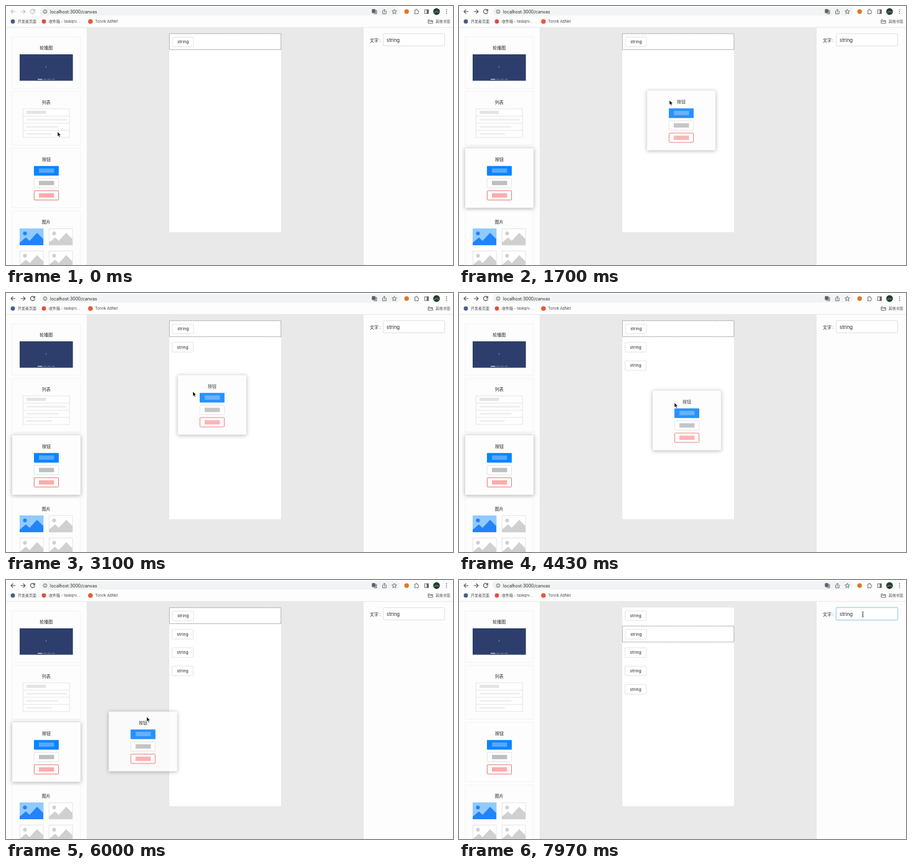
Animation of 720x418 px, one loop 8000 ms. Source, as an HTML page:

```html
<!DOCTYPE html>
<html lang="zh">
<head>
<meta charset="utf-8">
<title>Canvas editor</title>
<style>
html, body { margin: 0; width: 100%; height: 100%; overflow: hidden; background: #fff; }
svg { display: block; width: 100%; height: 100%; }
text { font-family: Inter, "Noto Sans CJK SC", "Noto Sans CJK", sans-serif; font-size: 7px; fill: #262626; }
.mid { text-anchor: middle; }
.bar { font-size: 6px; fill: #45494d; }
.line { fill: none; stroke: #5f6368; stroke-width: .9; }
.box { fill: #fdfdfd; stroke: #eeeeee; stroke-width: .7; }
.frame { fill: #fff; stroke: #d9d9d9; stroke-width: .7; }
.shade { filter: drop-shadow(0 1px 3px rgba(0, 0, 0, .32)); }
#nav { fill: none; stroke-width: 1.1; }
</style>
</head>
<body>
<svg viewBox="0 0 720 418" preserveAspectRatio="none">
  <defs>
    <g id="buttonFace">
      <rect class="box" width="110" height="96"/>
      <text class="mid" x="55" y="20">按钮</text>
      <rect x="35" y="28.5" width="40" height="15.5" rx="1" fill="#0a84ff"/>
      <rect x="43" y="32.5" width="24.5" height="7" fill="#54a9ff"/>
      <rect class="frame" x="35.3" y="48.6" width="39.4" height="15" rx="1"/>
      <rect x="43" y="52.5" width="24.5" height="7" fill="#bfbfbf"/>
      <rect x="35.4" y="68.4" width="39.2" height="15" rx="1" fill="#fff" stroke="#e8605f" stroke-width=".9"/>
      <rect x="43" y="72.5" width="24.5" height="7" fill="#fcacac"/>
    </g>
    <path id="hills" d="M0 27V23L10 14.5L16 20L28 7L38 17V27Z"/>
    <g id="picture">
      <rect class="frame" x=".3" y=".3" width="37.8" height="26.6"/>
      <use href="#hills" fill="#d0d0d0"/>
      <circle cx="8.5" cy="8" r="3.1" fill="#d0d0d0"/>
    </g>
  </defs>

  <rect width="720" height="418" fill="#fdfdfd"/>

  <g id="browser">
    <rect x="54" y="2" width="581" height="13.5" rx="6.7" fill="#f1f3f4"/>
    <g id="nav">
      <path d="M15.2 9H8M11.4 5.6L8 9L11.4 12.4"/>
      <path d="M23.8 9H31M27.6 5.6L31 9L27.6 12.4"/>
      <path d="M45.6 6.6A3.5 3.5 0 1 0 46.4 9.5M46.4 5V7.9H43.4"/>
    </g>
    <g class="line">
      <circle cx="63" cy="9" r="2.9"/>
      <path d="M63 8.6V10.7M63 7V7.8"/>
      <rect x="589.8" y="5.4" width="4.6" height="5.6" rx=".5" fill="#5f6368"/>
      <path d="M594.5 7H597V12.6H592.4M594 9H596.4M595 9.2L596 11.4"/>
      <path d="M607.6 8H606.6V12.6H612.2V8H611.2M609.4 10.6V5.3M607.6 7L609.4 5.2L611.2 7"/>
      <path d="M625.5 5.2L626.6 7.8L629.3 8L627.2 9.8L627.9 12.5L625.5 11L623.1 12.5L623.8 9.8L621.7 8L624.4 7.8Z"/>
      <path d="M658.2 7H660V6A1 1 0 0 1 662 6V7H663.8V8.8A1 1 0 0 1 663.8 10.8V12.6H658.2V10.8A1 1 0 0 0 658.2 8.8Z"/>
      <rect x="674.4" y="6" width="6.2" height="6.2"/>
      <path d="M679 6V12.2" stroke-width="2.8"/>
    </g>
    <circle cx="645.3" cy="9" r="3.7" fill="#e27625"/>
    <circle cx="693.5" cy="9" r="5.4" fill="#263c2c"/>
    <path d="M690 11Q693 7 697 10.5" fill="none" stroke="#718d78" stroke-width="1.4"/>
    <g fill="#4b4f53">
      <circle cx="709.5" cy="6" r=".8"/><circle cx="709.5" cy="9" r=".8"/><circle cx="709.5" cy="12" r=".8"/>
    </g>
    <text x="71" y="11.6">localhost:3000/canvas</text>
    <circle cx="11" cy="25" r="3.4" fill="#465f82"/>
    <circle cx="61" cy="25" r="3.4" fill="#e34c3e"/>
    <circle cx="136" cy="25" r="3.8" fill="#e75b32"/>
    <text class="bar" x="19" y="27.3">开发者页面</text>
    <text class="bar" x="69" y="27.3">收件箱 - taskqrv...</text>
    <text class="bar" x="143.5" y="27.3">Torvik AdNel</text>
    <path class="line" d="M680 22.5H683L684 23.6H687.2V28H680ZM680 24.8H687.2"/>
    <text class="bar" x="691.8" y="27.3">其他书签</text>
    <path d="M0 34.6H720" stroke="#e2e3e4" stroke-width=".8"/>
  </g>

  <rect x="130" y="35" width="446" height="383" fill="#e9e9e9"/>
  <rect x="263" y="44.5" width="180" height="320.5" fill="#fff"/>

  <g id="sidebar">
    <rect class="box" x="10" y="50" width="110" height="83"/>
    <text class="mid" x="64.7" y="69.8">轮播图</text>
    <rect x="22" y="78" width="85.7" height="42.6" fill="#2d3e6c"/>
    <text class="mid" x="64.5" y="100" style="font-size:4px;fill:#d6dbe8">1</text>
    <path d="M51 118.3H58.5" stroke="#fff" stroke-width="1"/>
    <path d="M60 118.3H65.5M67 118.3H72M73.5 118.3H78.5" stroke="#7a86a5" stroke-width="1"/>

    <rect class="box" x="10" y="138" width="110" height="86.5"/>
    <text class="mid" x="64.7" y="157.8">列表</text>
    <rect class="frame" x="27.3" y="166" width="74.8" height="46"/>
    <path d="M27.3 177.7H102M27.3 189.2H102M27.3 200.7H102" stroke="#d9d9d9" stroke-width=".7"/>
    <path d="M33 171.6H64.5" stroke="#e4e4e4" stroke-width="5"/>
    <path d="M33 183.5H97.5M33 195H84.5M33 206.6H73.5" stroke="#efefef" stroke-width="3"/>

    <use id="source" href="#buttonFace" x="10" y="229.7"/>

    <rect class="box" x="10" y="331" width="110" height="95"/>
    <text class="mid" x="64.7" y="350.8">图片</text>
    <g transform="translate(22 359)">
      <rect width="38.4" height="27.2" fill="#90caff"/>
      <use href="#hills" fill="#2283fa"/>
      <circle cx="8.5" cy="8" r="3.1" fill="#2283fa"/>
    </g>
    <use href="#picture" x="69" y="359"/>
    <use href="#picture" x="22" y="395"/>
    <use href="#picture" x="69" y="395"/>
  </g>

  <g id="settings">
    <text x="586" y="57.6">文字&#8201;:</text>
    <rect id="glow" x="606.8" y="43.9" width="100.4" height="21.2" rx="1.5" fill="none" stroke="#d8edff" stroke-width="1.6"/>
    <rect id="field" x="607.6" y="44.7" width="98.8" height="19.7" rx="1" fill="#fff" stroke-width=".8"/>
    <text x="613" y="57.6" style="font-size:7.9px">string</text>
  </g>

  <g id="rows"></g>
  <rect id="selection" x="263.3" width="179.5" height="25.8" fill="none" stroke="#555" stroke-width=".7" stroke-dasharray="1.6 1.1"/>
  <g id="ghost" opacity=".88"><use class="shade" href="#buttonFace"/></g>

  <g id="cursor">
    <path id="arrow" d="M0 0V7.6L1.7 6L2.9 8.8L4.3 8.2L3.1 5.5H5.5Z" fill="#000" stroke="#fff" stroke-width=".6"/>
    <path id="move" d="M0 -4.2L1.7 -2.3H.7V-.7H2.3V-1.7L4.2 0L2.3 1.7V.7H.7V2.3H1.7L0 4.2L-1.7 2.3H-.7V.7H-2.3V1.7L-4.2 0L-2.3 -1.7V-.7H-.7V-2.3H-1.7Z" fill="#000" stroke="#fff" stroke-width=".5" paint-order="stroke"/>
    <path id="beam" d="M-1.6 -4Q0 -4 0 -3Q0 -4 1.6 -4M0 -3V3M-1.6 4Q0 4 0 3Q0 4 1.6 4M-.8 .9H.8" fill="none" stroke="#222" stroke-width=".8"/>
  </g>
</svg>
<script>
const LOOP = 8000;
const ACTIVATE = 750, SELECT = 7050, FOCUS = 7780;
const ROW = 29.6;

// Pointer stops: time, x, y
const stops = [
  [0, 83, 203], [120, 83, 203], [680, 46, 245], [950, 46, 245],
  [1700, 339, 152], [1950, 334, 134],
  [2550, 34, 256], [2680, 34, 256], [3100, 301, 159], [3300, 309, 153],
  [3900, 45, 249], [4020, 45, 249], [4430, 347, 177], [4650, 349, 182],
  [5350, 71, 238], [5650, 71, 238], [6350, 381, 204],
  [6420, 381, 204], [6870, 370, 81], [7120, 370, 81],
  [7780, 650.5, 55.5], [LOOP, 650.5, 55.5]
];

const drags = [
  { hover: 600, grab: 950, drop: 1980, x: 46, y: 245 },
  { hover: 2480, grab: 2680, drop: 3330, x: 34, y: 256 },
  { hover: 3830, grab: 4020, drop: 4680, x: 45, y: 249 },
  { hover: 5280, grab: 5650, drop: 6390, x: 71, y: 238 }
];

const el = id => document.getElementById(id);
const show = (node, on) => node.style.display = on ? '' : 'none';
const place = (node, x, y) => node.setAttribute('transform', `translate(${x} ${y})`);

el('rows').innerHTML = Array.from({ length: 5 }, () =>
  '<g><rect class="frame" x=".3" y=".3" width="34" height="15.5" rx=".8"/>' +
  '<text class="mid" x="17.4" y="10.3" style="font-size:6.9px">string</text></g>').join('');
const rows = [...el('rows').children];

function pointerAt(t) {
  const i = stops.findIndex(s => s[0] > t);
  const [t0, x0, y0] = stops[i - 1], [t1, x1, y1] = stops[i];
  const p = (t - t0) / (t1 - t0), e = p * p * (3 - 2 * p);
  return [x0 + (x1 - x0) * e, y0 + (y1 - y0) * e];
}

function render(t) {
  const [x, y] = pointerAt(t);
  const drag = drags.find(d => t >= d.grab && t < d.drop);
  const count = 1 + drags.filter(d => t >= d.drop).length;
  const selected = t < SELECT ? 0 : 1;
  const focused = t >= FOCUS;

  place(el('cursor'), x, y);
  const rowY = y - 44.5;
  const overRow = !drag && x > 263 && x < 443 && rowY > 0 && rowY < count * ROW;
  const overField = x > 607 && x < 707 && y > 44 && y < 65;
  show(el('move'), overRow);
  show(el('beam'), overField);
  show(el('arrow'), !overRow && !overField);

  show(el('ghost'), drag);
  if (drag) place(el('ghost'), x - drag.x + 10, y - drag.y + 229.7);
  const lifted = drags.some(d => t >= d.hover && t < d.drop);
  el('source').setAttribute('class', lifted ? 'shade' : '');

  rows.forEach((row, i) => {
    show(row, i < count);
    place(row, i === selected ? 267.8 : 267.2, 49.5 + ROW * i + (i >= selected ? .4 : 0));
  });
  el('selection').setAttribute('y', 44.7 + ROW * selected);

  el('nav').setAttribute('stroke', t < ACTIVATE ? '#b9bcbf' : '#4b4f53');
  el('field').setAttribute('stroke', overField ? '#91c8f5' : '#d9d9d9');
  show(el('glow'), focused);
}

function tick() {
  render(performance.now() % LOOP);
  requestAnimationFrame(tick);
}
tick();
</script>
</body>
</html>
```
